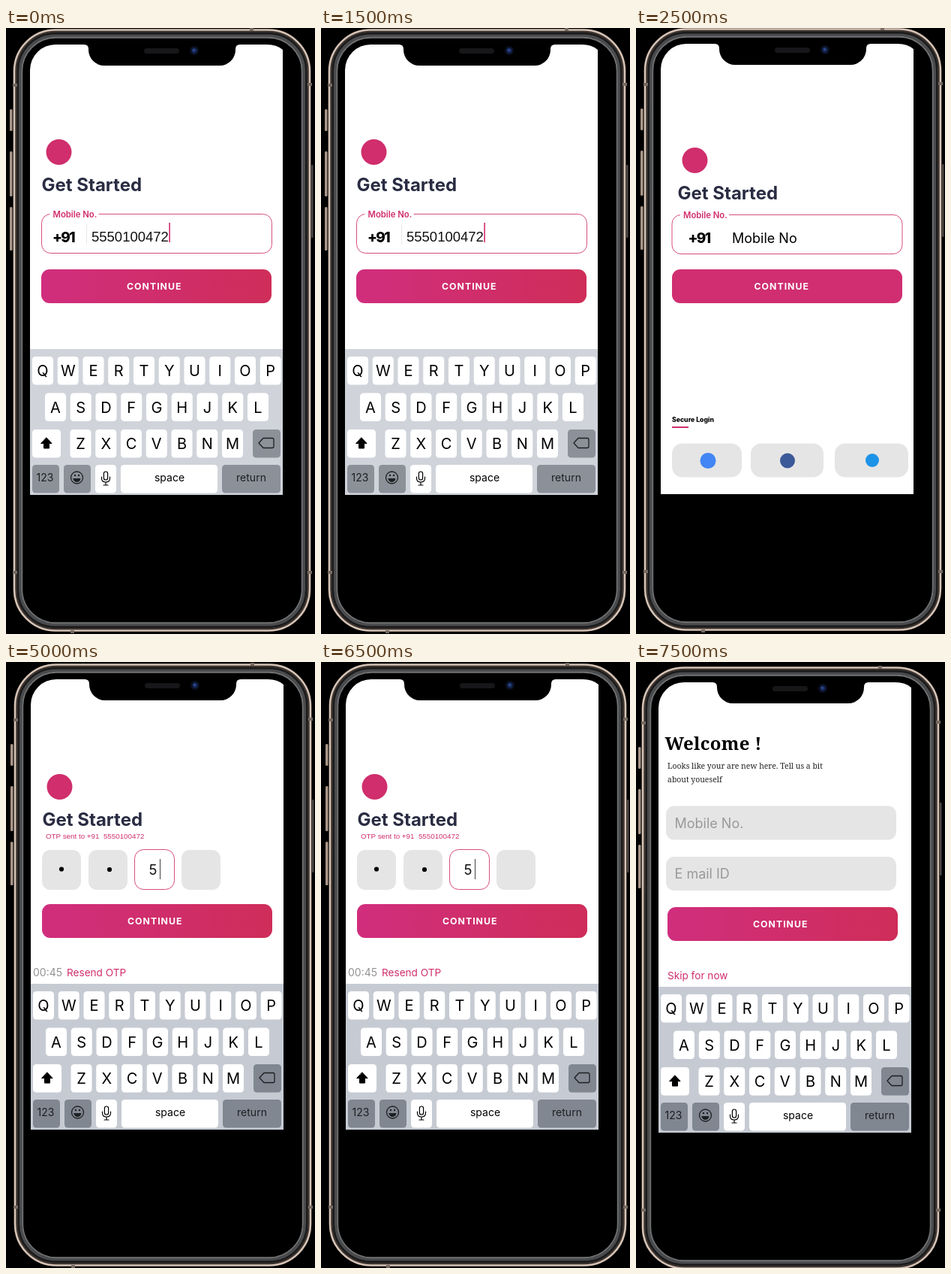
An HTML page for the animation above (10 s loop, 412 by 806 pixels).

```html
<!DOCTYPE html>
<html lang="en">
<head>
<meta charset="utf-8">
<title>Sign-in screens</title>
<style>
html, body { margin: 0; width: 100%; height: 100%; overflow: hidden; background: #000; }
svg { display: block; width: 412px; height: 806px; }
text { white-space: pre; }
.sans { font-family: "Liberation Sans", Arial, sans-serif; }
.ui { font-family: Inter, sans-serif; }
.bold { font-family: Inter, sans-serif; font-weight: 700; }
.serif { font-family: "Noto Serif", serif; }
</style>
</head>
<body>
<svg id="stage" viewBox="0 0 412 806"></svg>
<script>
const HOLD = 2500;
const PINK = '#d02e6c', GREY = '#e5e5e5', INK = '#292c42', DARK = '#1d2023';
const stage = document.getElementById('stage');

const rect = (x, y, w, h, r, fill, more = '') =>
  `<rect x="${x}" y="${y}" width="${w}" height="${h}" rx="${r}" fill="${fill}" ${more}/>`;
const ring = (inset, radius, width, color) =>
  rect(inset, inset - 8.5, 416 - 2 * inset, 821 - 2 * inset, radius, 'none', `stroke="${color}" stroke-width="${width}"`);
const dot = (x, y, r, fill) => `<circle cx="${x}" cy="${y}" r="${r}" fill="${fill}"/>`;
const path = (d, stroke, width = 1.3, fill = 'none') =>
  `<path d="${d}" stroke="${stroke}" stroke-width="${width}" fill="${fill}" stroke-linecap="round" stroke-linejoin="round"/>`;
const text = (s, x, y, size, font, fill = '#000', more = '') =>
  `<text x="${x}" y="${y}" font-size="${size}" class="${font}" fill="${fill}" ${more}>${s}</text>`;
const shift = (x, y, body) => `<g transform="translate(${x} ${y})">${body}</g>`;
const MID = 'text-anchor="middle"';

function phone() {
  const buttons = [[108, 29], [164, 60], [238, 58]]
    .map(([y, h]) => rect(5, y, 3.5, h, 1.5, '#a99688')).join('');
  const bands = [[9, 76], [402, 75], [9, 724], [402, 724]]
    .map(([x, y]) => rect(x, y - 2, 6, 4, 0, '#766a62')).join('');
  return buttons + rect(407, 182, 2.5, 97, 1, '#4f4742') +
    rect(10, 1.5, 396, 802, 54, '#000') +
    ring(13.5, 52, 3, '#3a332f') +
    ring(11, 55, 2.6, '#d6c3b5') +
    ring(16, 50, 2.4, '#1b1b1c') +
    ring(18.7, 47, 3.4, '#4a4b4d') +
    ring(21.2, 45, 2, '#6f7173') +
    bands + rect(325, 0, 5, 4, 0, '#766a62') + rect(86, 801, 5, 4, 0, '#766a62') +
    `<path d="M32 621V56A34 34 0 0 1 66 22H104Q110 22 110 28V29A21 21 0 0 0 131 50H285
      A21 21 0 0 0 306 29V28Q306 22 312 22H348Q361 22 369 29V621Z" fill="#fff"/>` +
    rect(184, 27, 47, 7, 3.5, '#17171a') +
    dot(251, 30, 6, '#0b1021') + dot(251, 30, 3.4, '#172a5c') + dot(250.5, 29.5, 1.3, '#3b57a0');
}

function keyboard(back, dark) {
  let out = rect(32, 427, 337, 194, 0, back);
  const key = (x, y, w, fill = '#fff') => rect(x, y, w, 37.5, 4.5, fill);
  [['QWERTYUIOP', 35, 437], ['ASDFGHJKL', 52, 485.5], ['ZXCVBNM', 85.5, 534]].forEach(([row, x0, y]) =>
    [...row].forEach((c, i) => {
      const x = x0 + i * 33.75;
      out += key(x, y, 28) + text(c, x + 14, y + 26, 20, 'ui', '#000', MID);
    }));
  out += key(35, 534, 38) + key(329, 534, 37, dark) +
    key(35, 581, 36, dark) + key(77, 581, 36, dark) + key(119, 581, 28) +
    key(153, 581, 129) + key(288, 581, 78, dark);
  // shift arrow, delete, smiley, microphone
  out += path('M54 545L61 552.5H57.5V559H50.5V552.5H47Z', '#000', 1, '#000') +
    path('M343 545.5H355Q357 545.5 357 547.5V556.5Q357 558.5 355 558.5H343L337 552Z', DARK) +
    path('M86.5 598a8 8 0 1 1 16 0a8 8 0 1 1-16 0', DARK) +
    path('M90 599.5H99Q98.5 603.5 94.5 603.5T90 599.5Z', DARK, 1, DARK) +
    dot(92, 595, 1.2, DARK) + dot(97, 595, 1.2, DARK) +
    rect(130.4, 590, 5.2, 11, 2.6, 'none', 'stroke="#000" stroke-width="1.2"') +
    path('M127.5 597V599Q127.5 604 133 604T138.5 599V597M133 604V608M130 608H136', '#000', 1.2);
  out += text('123', 52, 603, 14, 'ui', DARK, MID) +
    text('space', 218, 602.5, 14, 'ui', '#000', MID) +
    text('return', 327, 602.5, 14, 'ui', DARK, MID);
  return out;
}

const button = (x, y, fill = 'url(#rose)', label = x + 114) =>
  rect(x, y, 307, 45, 11, fill) + text('CONTINUE', label, y + 26.5, 12.3, 'bold', '#fff', 'letter-spacing="1"');

const heading = (x, y) =>
  dot(x + 23, y - 52, 17, PINK) + text('Get Started', x, y, 24, 'bold', INK);

const outline = (x, y, w, h) =>
  rect(x, y, w, h, 12, '#fff', `stroke="${PINK}" stroke-opacity=".85"`);

const numberField = (x, y) =>
  outline(x, y, 307, 52) + rect(x + 11, y - 3, 65, 6, 0, '#fff') +
  text('Mobile No.', x + 15, y + 4.5, 11.3, 'ui', PINK, 'font-weight="600"');

const prefix = (x, y) => text('+91', x, y, 19, 'ui', '#000', 'font-weight="800" letter-spacing="-1.7"');

const scenes = [
  [0, 0, () => heading(47.5, 217) + numberField(47.5, 247.5) + prefix(62, 285) +
    rect(107, 261, 1, 27, 0, '#e8e8e8') + text('5550100472', 114, 284, 18.5, 'sans', '#111') +
    rect(217.3, 259, 1.6, 26, 0, PINK) + button(47, 321) + keyboard('#d0d4da', '#8c9199')],

  [1, -1, () => heading(55.5, 228) + numberField(48, 248.5) + prefix(69.5, 286) +
    text('Mobile No', 128, 286, 18, 'ui') + button(48, 321, '#d02e71', 157.5) +
    text('Secure Login', 48, 523.5, 8.7, 'ui', '#000', 'font-weight="800"') +
    rect(48, 530, 22, 2, 0, PINK) +
    rect(48, 552.5, 93, 45, 14, GREY) + rect(153, 552.5, 97, 45, 14, GREY) + rect(265, 552.5, 98, 45, 14, GREY) +
    dot(96, 575.5, 10.5, '#4285f4') + dot(202, 575.5, 10, '#3b5998') + dot(315, 575, 9, '#1d93e8')],

  [1, 1, () => heading(48.5, 218) +
    text('OTP sent to +91\u00a0 5550100472', 53, 235, 9.8, 'sans', PINK) +
    [48, 110, 234].map(x => rect(x, 250, 52, 53, 11, GREY)).join('') +
    outline(171.5, 249.5, 53, 53) +
    dot(74, 275.5, 3.1, '#000') + dot(138, 276, 3.1, '#000') +
    text('5', 190.5, 282.5, 18.5, 'ui', '#111') + rect(205, 262, 1, 27, 0, '#444') +
    button(48, 322) + text('00:45', 36, 417.5, 14, 'ui', '#929292') +
    text('Resend OTP', 81, 417.5, 13.6, 'ui', PINK) +
    shift(1, 1, keyboard('#c6cbd3', '#808791'))],

  [-2, 5, () => text('Welcome !', 38.5, 117, 24, 'serif', '#000', 'font-weight="600" letter-spacing=".3"') +
    text('Looks like your are new here. Tell us a bit', 42, 142, 10.45, 'serif', '#222') +
    text('about youeself', 42, 160, 10.45, 'serif', '#222') +
    rect(40, 191.5, 307, 45, 11, GREY) + rect(40, 259, 307, 45, 11, GREY) +
    text('Mobile No.', 51.5, 221, 18, 'ui', '#999') + text('E mail ID', 51.5, 288, 18, 'ui', '#999') +
    button(42, 326) + text('Skip for now', 42, 422, 13.6, 'ui', PINK) +
    shift(-2, 5, keyboard('#c6cbd3', '#808791'))]
];

stage.innerHTML = `<defs><linearGradient id="rose"><stop stop-color="#d02e7d"/>
  <stop offset="1" stop-color="#cf2d59"/></linearGradient></defs>` +
  scenes.map(([x, y, draw]) => `<g class="scene">${shift(x, y, phone())}${draw()}</g>`).join('');

const groups = [...stage.querySelectorAll('.scene')];
const start = performance.now();

function show(now) {
  const index = Math.floor(Math.max(0, now - start) / HOLD) % groups.length;
  groups.forEach((g, i) => g.style.display = i === index ? '' : 'none');
  requestAnimationFrame(show);
}
show(start);
</script>
</body>
</html>
```
